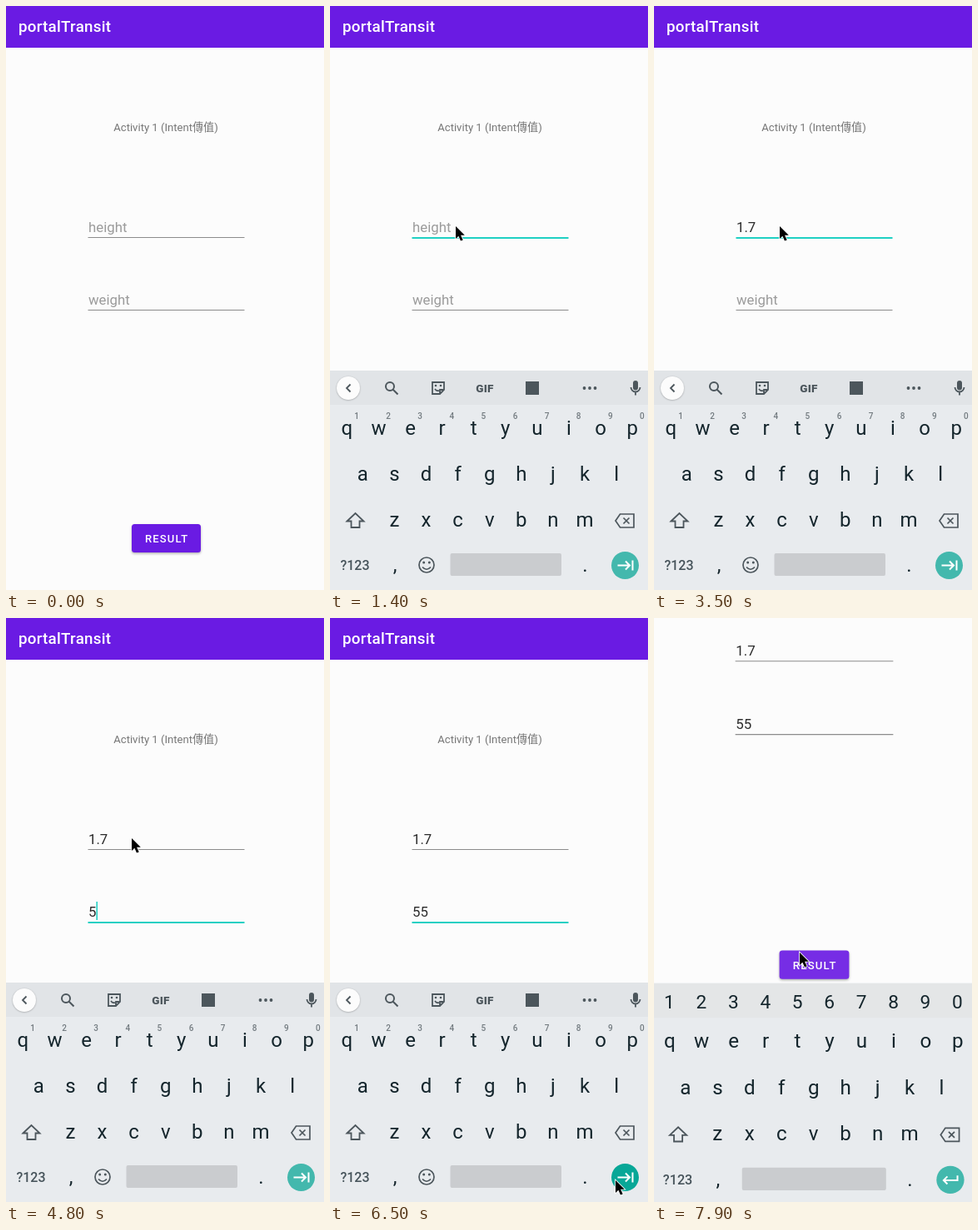
Write an HTML page with a canvas that moves like this. It is 382 by 700 pixels and loops after 8000 ms.

```html
<!DOCTYPE html>
<html lang="en">
<head>
<meta charset="utf-8">
<style>
  html, body { margin: 0; width: 100%; height: 100%; overflow: hidden; background: #fcfcfc; }
  canvas { display: block; }
</style>
</head>
<body>
<canvas id="stage" width="382" height="700"></canvas>
<script>
const ctx = document.getElementById('stage').getContext('2d');
const LOOP = 8000, STEP = 100, PAN = 223;
const PURPLE = [106, 27, 227], TEAL = '#20d0c3', INK = '#14252c', ICON = '#4c565c';
const FAMILY = 'Roboto, "Noto Sans CJK TC", "Noto Sans CJK", sans-serif';

const progress = (t, from, to) => Math.min(1, Math.max(0, (t - from) / (to - from)));
const ease = p => p * p * (3 - 2 * p);
const easeOut = p => 1 - (1 - p) ** 3;
const mix = (a, b, p) => a + (b - a) * p;

// Mouse tip at key times: [ms, x, y]
const mousePath = [
  [100, 382, 216], [500, 151, 264], [5500, 151, 264], [6200, 343, 674],
  [6700, 343, 674], [7100, 193, 455], [7400, 175, 401]
];

function mouseAt(t) {
  const next = mousePath.findIndex(k => k[0] > t);
  if (next < 0) return mousePath.at(-1).slice(1);
  const a = mousePath[next - 1], b = mousePath[next];
  const p = ease(progress(t, a[0], b[0]));
  return [mix(a[1], b[1], p), mix(a[2], b[2], p)];
}

function text(str, x, y, size, color, { align = 'left', weight = 400, spacing = 0 } = {}) {
  ctx.font = `${weight} ${size}px ${FAMILY}`;
  ctx.letterSpacing = spacing + 'px';
  ctx.textAlign = align;
  ctx.fillStyle = color;
  ctx.fillText(str, x, y);
}

function rect(x, y, w, h, color, radius = 0) {
  ctx.fillStyle = color;
  ctx.beginPath();
  ctx.roundRect(x, y, w, h, radius);
  ctx.fill();
}

function disc(x, y, r, color) {
  ctx.fillStyle = color;
  ctx.beginPath();
  ctx.arc(x, y, r, 0, 7);
  ctx.fill();
}

function icon(x, y, path, color = ICON, width = 1.8, fill) {
  const shape = new Path2D(path);
  ctx.save();
  ctx.translate(x, y);
  if (fill) {
    ctx.fillStyle = fill;
    ctx.fill(shape);
  }
  ctx.strokeStyle = color;
  ctx.lineWidth = width;
  ctx.stroke(shape);
  ctx.restore();
}

function withShadow(blur, dy, draw) {
  ctx.save();
  ctx.shadowColor = 'rgba(0,0,0,.3)';
  ctx.shadowBlur = blur;
  ctx.shadowOffsetY = dy;
  draw();
  ctx.restore();
}

function field(y, hint, value, focused, caret) {
  text(value || hint, 99, y + 271, 16.8, value ? '#2b2b2b' : '#9b9b9b');
  if (focused) rect(98.5, y + 277, 188, 2, TEAL);
  else rect(98.5, y + 277, 188, 1, '#8c8c8c');
  if (focused && caret) rect(99 + (value ? ctx.measureText(value).width : 0), y + 253, 1.6, 22, TEAL);
}

function button(t) {
  const light = t < 7000 ? 0 : mix(0.26, 0.08, progress(t, 7500, 7800));
  const color = `rgb(${PURPLE.map(c => mix(c, 255, light))})`;
  withShadow(3, 1.5, () => rect(151, 621, 83, 34, color, 3.5));
  text('RESULT', 167, 643, 13, '#fff', { weight: 500, spacing: 1.15 });
}

function activity(t) {
  const [heightText, weightText] = [
    t < 2000 ? '' : t < 2500 ? '1' : t < 2900 ? '1.' : '1.7',
    t < 4700 ? '' : t < 4900 ? '5' : '55'
  ];
  const focus = t < 500 ? '' : t < 3700 ? 'height' : t < 6600 ? 'weight' : 'button';
  // The caret blinks from the last edit or focus change.
  const lastEdit = [900, 2000, 2500, 2900, 3700, 4700, 4900].filter(e => e <= t).at(-1);
  const caret = lastEdit !== undefined && (t - lastEdit) % 1000 < 500;

  rect(0, 0, 382, 50, `rgb(${PURPLE})`);
  text('portalTransit', 15, 31, 18.8, '#fff', { weight: 500, spacing: 0.25 });
  text('Activity 1 (Intent傳值)', 192, 150, 13.1, '#777', { align: 'center' });
  field(0, 'height', heightText, focus === 'height', caret);
  field(87, 'weight', weightText, focus === 'weight', caret);
  button(t);
}

function keyRow(keys, x, y, size = 24, color = INK, weight = 400) {
  [...keys].forEach((key, i) =>
    text(key, x + i * 38.1, y, size, color, { align: 'center', weight }));
}

function toolbar() {
  withShadow(2, 0.5, () => disc(22, 458, 14, '#fcfcfc'));
  icon(22, 458, 'M2.5-4.5L-2 0L2.5 4.5');
  icon(72, 456, 'M5 0A5 5 0 1 1-5 0A5 5 0 1 1 5 0M3.7 3.7L9.5 9.5', ICON, 2);
  icon(130, 458, 'M-7-7H7V2L2 7H-7ZM7 2H2V7M-4 1Q-2 4 1 3');
  disc(127, 455, 1.3, ICON);
  disc(133, 455, 1.3, ICON);
  text('GIF', 186, 462.5, 13.5, ICON, { align: 'center', weight: 900, spacing: 0.3 });
  rect(235, 450, 16, 16, ICON);
  for (const x of [305.5, 312, 318.5]) disc(x, 458, 1.9, ICON);
  rect(364, 449, 6, 11.5, ICON, 3);
  icon(367, 458, 'M-5.5-1A5.5 5.5 0 0 0 5.5-1M0 5V8.5');
}

function keyboard(t) {
  const withDigits = t >= 6600;
  rect(-5, 437, 392, 290, '#e8ebee');
  rect(-5, 437, 392, 41, withDigits ? '#e4e6e7' : '#e1e4e7');
  if (withDigits) keyRow('1234567890', 20, 467, 22.5);
  else {
    toolbar();
    keyRow('1234567890', 32, 495, 10, '#737b80', 500);
  }
  keyRow('qwertyuiop', 20.3, 514, 24);
  keyRow('asdfghjkl', 39.3, 569, 24);
  keyRow('zxcvbnm', 77.4, 624, 24);
  icon(30.5, 617, 'M-10 .5L0-9L10 .5H5V8H-5V.5Z');
  icon(354, 617, 'M-11 0L-5.5-8H11V8H-5.5ZM-1.5-3.5L5.5 3.5M5.5-3.5L-1.5 3.5', ICON, 1.7);
  text('?123', 30, 676, 16, '#47545b', { align: 'center', weight: 500 });
  text(',', 78, 678, 24, INK, { align: 'center' });
  text('.', 306.5, 678, 24, INK, { align: 'center' });

  const spaceX = withDigits ? 106.5 : 144.5;
  rect(spaceX, 656, 278 - spaceX, 27, '#cacccf', 2);
  if (!withDigits) {
    icon(116, 670, 'M9 0A9 9 0 1 1-9 0A9 9 0 1 1 9 0M-5 2.5Q0 8 5 2.5', ICON, 1.7);
    disc(112.7, 667, 1.5, ICON);
    disc(119.3, 667, 1.5, ICON);
  }
  const pressed = t >= 6400 && t < 6700;
  disc(354.5, 670.5, 16.5, pressed ? '#08a797' : '#43b8ad');
  icon(354.5, 670.5, withDigits
    ? 'M8.5-5V.5H-8M-3.5-4L-8 .5L-3.5 5'
    : 'M-9 0H5.5M.5-5L5.5 0L.5 5M9-6V6', '#fff', 2);
}

function mouse(x, y) {
  icon(x, y, 'M0 0V15L3.4 11.8L6 17.6L8.7 16.4L6.1 10.8H10.8Z', '#fff', 1.6, '#000');
  icon(x, y, 'M0 0V15L3.4 11.8L6 17.6L8.7 16.4L6.1 10.8H10.8Z', 'transparent', 0, '#000');
}

function draw(now) {
  const t = Math.floor((now % LOOP) / STEP) * STEP;
  ctx.fillStyle = '#fcfcfc';
  ctx.fillRect(0, 0, 382, 700);

  ctx.save();
  if (t >= 7900) {
    // The screen starts to zoom as the next one opens.
    ctx.translate(191, 350);
    ctx.scale(1.009, 1.009);
    ctx.translate(-191, -350);
  }
  ctx.save();
  ctx.translate(0, -PAN * easeOut(progress(t, 6600, 6900)));
  activity(t);
  ctx.restore();

  ctx.save();
  ctx.translate(0, 263 * (1 - easeOut(progress(t, 600, 900))));
  keyboard(t);
  ctx.restore();
  ctx.restore();

  if (t >= 100) mouse(...mouseAt(t));
  requestAnimationFrame(draw);
}
requestAnimationFrame(draw);
</script>
</body>
</html>
```
